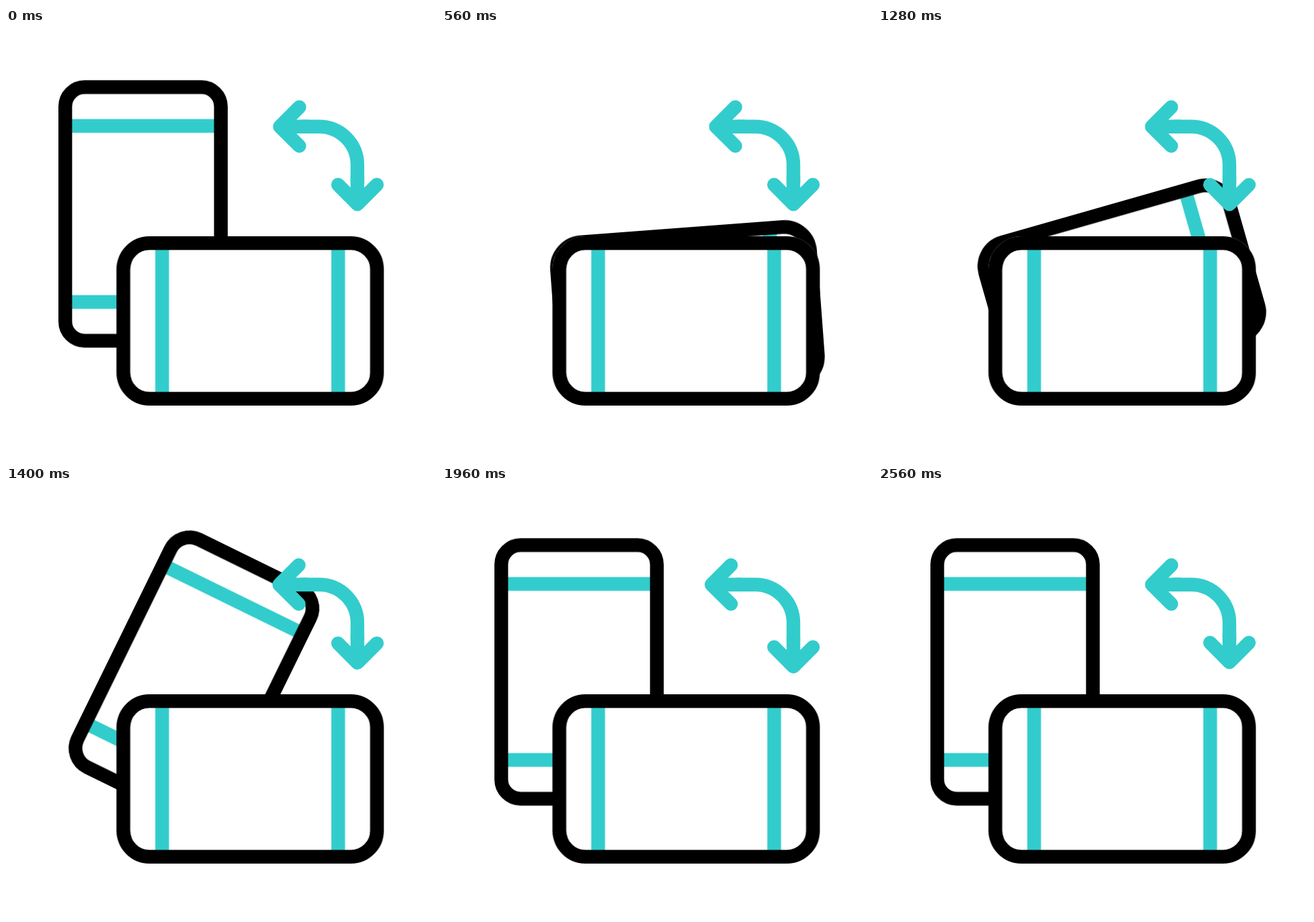
Write an HTML page that moves like this. It is 640x640 px and loops after 2.8 s.

```html
<!DOCTYPE html>
<html lang="en">
<head>
<meta charset="utf-8">
<title>Rotate device</title>
<style>
  html, body { margin: 0; width: 100%; height: 100%; overflow: hidden; background: #fff; }
  svg { display: block; width: 100vw; height: 100vh; }
  path, .case { fill: none; stroke-width: 20.4; }
  .case { stroke: #000; }
  .accent { stroke: #3cc; }
  .arrow { stroke-linecap: round; stroke-linejoin: round; }

  .slide, .turn, .turn .case, .head {
    animation: 2800ms cubic-bezier(.77, 0, .23, 1) infinite;
  }
  .slide { animation-name: slide; }
  .turn { animation-name: turn; }
  .turn .case { animation-name: soften; }
  .head { animation-name: nudge; }
  .left { --out: -7.4px 0px; --in: 6px 0px; }
  .down { --out: 0px 7.4px; --in: 0px -6px; }

  /* The pivot drifts while the phone swings around it. */
  @keyframes slide {
    0%, .964%, 61.179%, 100% { transform: translate(204px, 471.7px); }
    26.143%, 36% { transform: translate(169.2px, 435.9px); }
  }
  @keyframes turn {
    0%, .964%, 61.179%, 100% { transform: rotate(0deg); }
    26.143%, 36% { transform: rotate(90deg); }
  }
  @keyframes soften {
    0%, .964%, 61.179%, 100% { rx: 28.8px; ry: 28.8px; }
    26.143%, 36% { rx: 38.8px; ry: 38.8px; }
  }
  @keyframes nudge {
    0%, 41.429%, 91.786%, 100% { translate: 0px 0px; }
    66.607% { translate: var(--out); }
    79.179% { translate: var(--in); }
  }
</style>
</head>
<body>
<svg viewBox="0 0 640 640">
  <defs>
    <path id="bars" d="M-106-131H106M-106 131H106"/>
  </defs>

  <g class="slide">
    <g class="turn">
      <g transform="translate(0 -195)">
        <use href="#bars" class="accent"/>
        <rect class="case" x="-115.8" y="-188.7" width="231.6" height="377.4" rx="28.8"/>
      </g>
    </g>
  </g>

  <g transform="translate(363.4 436) rotate(90)">
    <rect x="-126" y="-198.9" width="252" height="397.8" rx="49" fill="#fff"/>
    <use href="#bars" class="accent"/>
    <rect class="case" x="-115.8" y="-188.7" width="231.6" height="377.4" rx="38.8"/>
  </g>

  <g class="accent arrow">
    <path d="M440 146.7H466A57 57 0 0 1 523 203.7V230"/>
    <path class="head left" d="M436.6 117.8L407.6 146.7L436.6 175.6M407.6 146.7H450"/>
    <path class="head down" d="M494.2 233.2L523 262.2L552 233.2M523 262.2V220"/>
  </g>
</svg>
</body>
</html>
```
